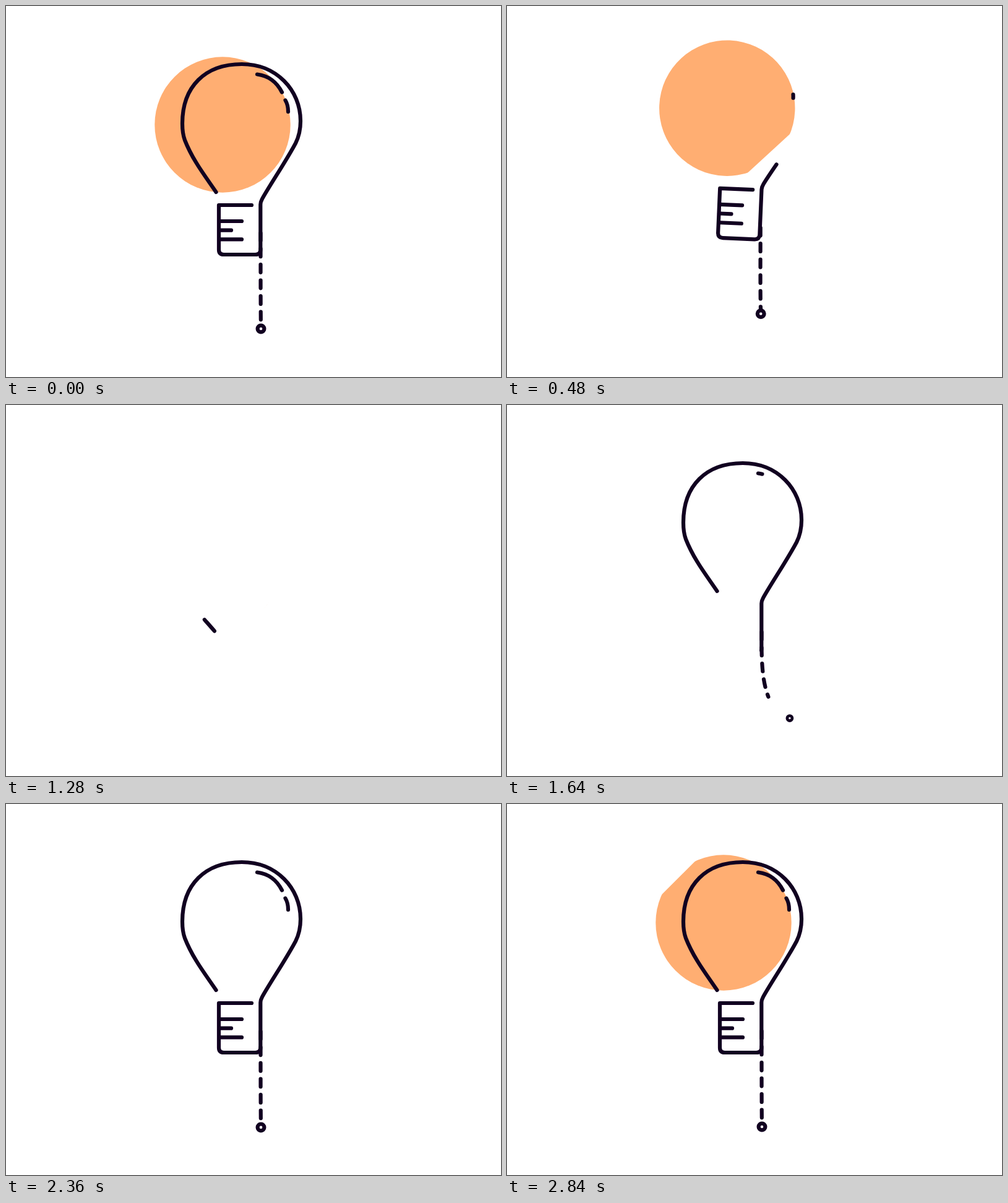
Recreate the animation shown at these times as an HTML page. Size 800 px wide and 600 px high, loop 2.88 s.

```html
<!DOCTYPE html>
<html lang="en">
<head>
<meta charset="utf-8">
<title>Light bulb</title>
<style>
  html, body { margin: 0; width: 100%; height: 100%; overflow: hidden; background: #fff; }
  svg { display: block; width: 100vw; height: 100vh; }
  .ink { fill: none; stroke: #110020; stroke-width: 6.2; stroke-linecap: round; stroke-linejoin: round; }
</style>
</head>
<body>
<svg viewBox="0 0 800 600">
  <defs>
    <clipPath id="disc"><circle cx="350" cy="192" r="109.7"/></clipPath>
  </defs>
  <g id="body">
    <g clip-path="url(#disc)">
      <rect id="glow" y="-120" height="240" fill="#ffae72" transform="translate(350 192) rotate(45)"/>
    </g>
    <g class="ink">
      <path id="outline" d="M339.5 301 C322 275 302 250 289 217 C286 209 285 199 285 190
        C285 130 322 94 381 94 C437 94 476 136 476 186 C476 200 473 212 468 222
        C452 252 428 287 414 312 Q411.3 317 411.3 321 V394 Q411.3 402 403 402
        H352 Q344 402 344 394 V322 H397"/>
      <path id="shineA" d="M406 110.5 Q433 114 446 139.5"/>
      <path id="shineB" d="M451.5 152.5 Q456 160 456 171"/>
      <path id="thread1" d="M344.5 348 H381"/>
      <path id="thread2" d="M344.5 362.7 H364"/>
      <path id="thread3" d="M344.5 377.4 H381"/>
    </g>
  </g>
  <path id="cord" class="ink"/>
  <circle id="knob" r="5.4" fill="#fff" stroke="#110020" stroke-width="6.2"/>
</svg>
<script>
const LOOP = 2880;
const PIVOT = { x: 376, y: 326 };
const HOOK = { x: 411.5, y: 367 };
const DASH = 12.75;
const RADIUS = 110;

const el = id => document.getElementById(id);
const parts = ["body", "glow", "outline", "shineA", "shineB", "cord", "knob"]
  .reduce((all, id) => ({ ...all, [id]: el(id) }), {});

// start of erasing, start of drawing
const threads = [
  { path: el("thread1"), out: 554, back: 1826 },
  { path: el("thread2"), out: 520, back: 1790 },
  { path: el("thread3"), out: 451, back: 1776 }
];

const clamp = u => Math.min(1, Math.max(0, u));
const smooth = u => u * u * (3 - 2 * u);
const cubic = u => u < 0.5 ? 4 * u ** 3 : 1 - 4 * (1 - u) ** 3;
const ramp = (t, start, span, ease = smooth) => ease(clamp((t - start) / span));

// Show only the stretch of a path between lengths a and b.
function trim(path, a, b) {
  const length = path.getTotalLength();
  a = Math.max(0, a);
  b = Math.min(length, b);
  path.style.display = b - a > 0.05 ? "" : "none";
  if (b - a <= 0.05) return;
  path.setAttribute("stroke-dasharray", `${b - a} ${length + 10}`);
  path.setAttribute("stroke-dashoffset", -a);
}

// Like trim, with dashes counted from the start of the stretch.
function trimDashed(path, from, to) {
  const length = path.getTotalLength();
  const a = from * length, b = to * length;
  const list = [];
  for (let s = a; s < b - 0.05; s += 2 * DASH) list.push(Math.min(DASH, b - s), DASH);
  path.style.display = list.length ? "" : "none";
  if (!list.length) return;
  list[list.length - 1] = 2000;
  path.setAttribute("stroke-dasharray", list.join(" "));
  path.setAttribute("stroke-dashoffset", -a);
}

// The window of a stroke that is erased from its start, then drawn from its start.
function strokeWindow(t, leaving, out, outSpan, back, backSpan, ease) {
  return leaving ? [ramp(t, out, outSpan, ease), 1] : [0, ramp(t, back, backSpan, ease)];
}

function pose(t, leaving) {
  if (leaving) {
    return {
      angle: 14.3 * Math.pow(Math.max(0, Math.min(t, 800) - 360) / 280, 2.1),
      lift: -66.2 * ramp(t, 366, 270)
    };
  }
  const left = 1 - ramp(t, 1120, 430);
  return { angle: -9.5 * left, lift: 88 * left };
}

function place(point, { angle, lift }) {
  const r = angle * Math.PI / 180;
  const x = point.x - PIVOT.x, y = point.y - PIVOT.y;
  return {
    x: PIVOT.x + x * Math.cos(r) - y * Math.sin(r),
    y: PIVOT.y + x * Math.sin(r) + y * Math.cos(r) + lift
  };
}

function drawGlow(t, leaving) {
  let from = -120, to = 120;
  if (leaving && t > 60) to = RADIUS * (1 - 2 * ramp(t, 451, 227));
  else from = RADIUS * (1 - 2 * ramp(leaving ? t + LOOP : t, 2470, 416));
  if (to <= -RADIUS) to = from;
  parts.glow.setAttribute("x", from);
  parts.glow.setAttribute("width", Math.max(0, to - from));
}

function drawCord(t, leaving, now) {
  const top = place(HOOK, now);
  let swing = 0.5, pull = 0;
  if (!leaving) {
    swing += 45 * (1 - ramp(t, 1620, 700));
    pull = 42 * (ramp(t, 2340, 240) - ramp(t, 2600, 200));
  }
  top.y += pull;
  const bow = -0.06 * swing - 0.25 * Math.max(0, now.angle);
  const end = { x: top.x + swing, y: top.y + 155 - 0.0075 * swing * swing };
  parts.cord.setAttribute("d",
    `M${top.x} ${top.y} C${top.x} ${top.y + 50} ${top.x + bow} ${top.y + 125} ${end.x} ${end.y}`);
  trimDashed(parts.cord, ...strokeWindow(t, leaving, 401, 402, 1480, 260));

  const size = leaving ? 1 - ramp(t, 770, 190) : ramp(t, 1520, 180);
  parts.knob.setAttribute("transform", `translate(${end.x} ${end.y}) scale(${size})`);
  parts.knob.style.display = size > 0 ? "" : "none";
}

function draw(t) {
  const leaving = t < 1000;
  const now = pose(t, leaving);
  parts.body.setAttribute("transform",
    `translate(0 ${now.lift}) rotate(${now.angle} ${PIVOT.x} ${PIVOT.y})`);

  const whole = parts.outline.getTotalLength();
  const [a, b] = strokeWindow(t, leaving, 39, 812, 1115, 860, cubic);
  trim(parts.outline, a * whole, b * whole);

  const first = parts.shineA.getTotalLength();
  const both = first + parts.shineB.getTotalLength();
  const [c, d] = strokeWindow(t, leaving, 39, 605, 1500, 500, cubic);
  trim(parts.shineA, c * both, d * both);
  trim(parts.shineB, c * both - first, d * both - first);

  for (const { path, out, back } of threads) {
    const length = path.getTotalLength();
    const [from, to] = strokeWindow(t, leaving, out, 300, back, 300);
    trim(path, from * length, to * length);
  }

  drawGlow(t, leaving);
  drawCord(t, leaving, now);
}

const begin = performance.now();
function tick() {
  draw((performance.now() - begin) % LOOP);
  requestAnimationFrame(tick);
}
tick();
</script>
</body>
</html>
```
